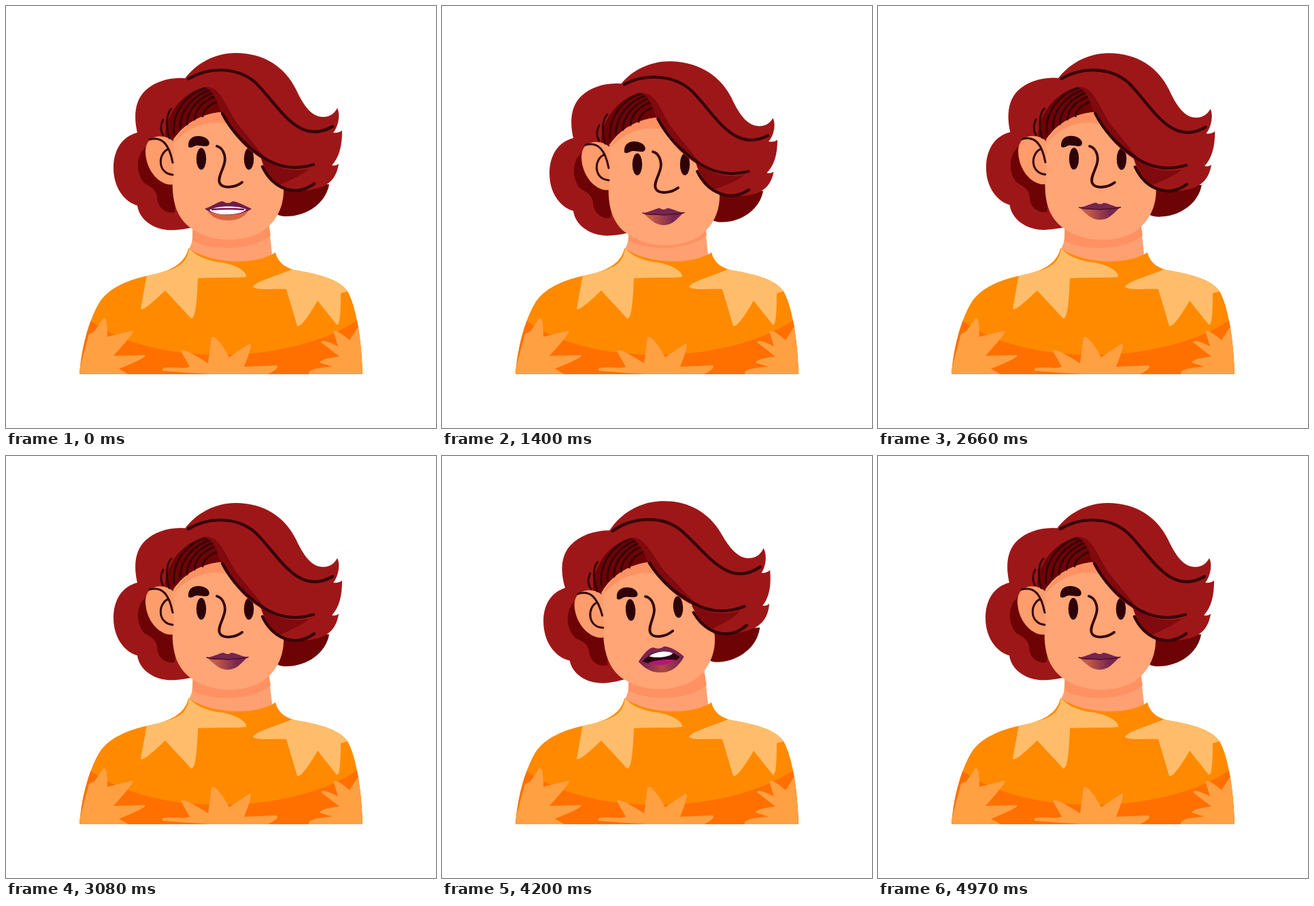
Animation, 632 px wide and 620 px high, one loop 5.25 s. Source, as an HTML page:

```html
<!DOCTYPE html>
<html lang="en">
<head>
<meta charset="utf-8">
<style>
  html, body { margin: 0; width: 100%; height: 100%; overflow: hidden; background: #fff; }
  svg { display: block; width: 632px; height: 620px; }
  .hair { fill: #9e1718; }
  .dark { fill: #6e0305; }
  .deep { fill: #800a0d; }
  .skin { fill: #ffa576; }
  .shade { fill: #ff9163; }
  .ink { fill: #2e0207; }
  .line { fill: none; stroke: #350207; stroke-width: 4.4; stroke-linecap: round; }
  .thin { stroke-width: 3; }
</style>
</head>
<body>
<svg viewBox="0 0 632 620">
  <defs>
    <path id="torso" d="M108 541C110 512 119 466 137 436 151 413 183 401 214 395 245 389 264 376 268 356 303 379 365 382 396 362 400 378 412 386 430 389 460 394 490 402 502 419 519 450 523 510 524 541Z"/>
    <clipPath id="cut"><use href="#torso"/></clipPath>
    <linearGradient id="lip"><stop offset=".2" stop-color="#c85a45"/><stop offset=".75" stop-color="#78264f"/></linearGradient>
    <linearGradient id="lowLip"><stop offset=".1" stop-color="#7d2450"/><stop offset=".5" stop-color="#b04745"/><stop offset="1" stop-color="#74204c"/></linearGradient>
  </defs>

  <g class="head">
    <path class="hair" d="M280 108C250 102 222 108 205 124 188 140 188 165 193 186 170 192 158 212 158 238 158 268 175 288 193 293 196 315 220 332 250 329 262 328 272 326 278 324L330 200 322 128Z"/>
    <path class="dark" d="M208 205C190 218 190 245 203 260 212 266 220 268 222 280 222 296 235 306 248 303L252 240Z"/>
    <path id="under" class="dark" d="M372 222L462 262 475 262C470 290 442 309 412 309 404 309 399 307 396 304L380 270Z"/>
  </g>

  <path d="M275 310H385L391 364 380 390 290 385 268 358Q274 350 274 338Z" fill="#ffa072"/>
  <path class="shade" d="M275 320H386L389 337C360 360 305 360 274 345Z"/>
  <use href="#torso" fill="#ff8a00"/>
  <g clip-path="url(#cut)">
    <g fill="#ffbd6b">
      <path d="M269 356C266 378 255 388 207 395L198 445Q202 449 234 418L272 459Q280 462 282 400C310 398 340 400 353 398 355 390 335 378 310 376 290 372 278 366 269 356Z"/>
      <path d="M420 387C400 396 365 405 363 413 370 418 395 415 412 416L428 470Q434 474 458 433L486 468Q492 472 492 422L503 419C490 402 470 394 440 388Z"/>
    </g>
    <path d="M100 440C180 535 430 535 532 450V541H100Z" fill="#ff7000"/>
    <g fill="#ffa042">
      <path d="M106 541L122 482 130 478 143 459Q149 455 149 486L186 477Q191 478 158 514L204 513Q209 516 166 533L180 541Z"/>
      <path d="M230 532C250 529 262 534 270 530L257 507Q260 501 297 525L302 487Q309 482 328 516L358 496Q364 495 350 530L398 528Q403 532 385 541H300L230 536Z"/>
      <path d="M526 541H445Q442 532 480 530L461 524Q462 518 490 515L463 494Q464 488 488 500L481 478Q486 474 505 491L517 472 526 490Z"/>
    </g>
  </g>

  <g class="head">
    <path class="dark" d="M234 196C232 165 255 125 300 117L330 165C290 160 265 175 247 200Z"/>
    <path class="skin" d="M246 196C262 172 290 157 318 156L360 200 408 268C409 298 394 321 374 333 345 348 300 348 270 325 250 310 243 285 245 250Z"/>
    <path class="shade" d="M245 203C262 172 290 157 318 156L336 176C300 165 270 175 245 203Z"/>
    <path fill="#ff9c6c" d="M247 200C236 188 206 186 205 213 205 245 230 266 246 262Z"/>
    <path class="line thin" d="M211 196C230 191 240 204 245 230M239 210C223 216 222 246 245 248"/>
    <path class="line thin" d="M231 190C226 182 228 173 231 167M240 194C234 176 236 158 243 151M247 187C244 160 262 126 300 119M256 180C255 155 274 130 304 122M266 174C266 154 282 134 308 126M277 167C278 150 292 138 312 131M289 162C291 150 302 143 316 139"/>
    <path class="ink" d="M268 204C268 191 283 188 294 194 301 199 300 206 294 206 287 206 280 203 275 207 270 209 267 208 268 204Z"/>
    <g class="ink">
      <ellipse class="eye" cx="287" cy="224.500" rx="7.200" ry="16"/>
      <ellipse class="eye" cx="357" cy="224.500" rx="7.200" ry="16"/>
    </g>
    <path class="line" style="stroke-width:3.8" d="M310 206C318 208 324 219 321 231 318 243 311 252 314 260 318 269 337 267 347 259"/>

    <g class="mouth">
      <path d="M292 298C305 293 314 286 319 287Q326 292 333 287C340 287 350 293 361 298 350 305 340 307 326 307 312 307 300 304 292 298Z" fill="#6f1c49"/>
      <path d="M296 301C305 306 315 307 326 307 340 307 350 304 357 300 350 311 340 315 326 315 312 315 302 310 296 301Z" fill="#d9643f"/>
      <path d="M299 300C310 293 342 293 353 299 345 308 308 309 299 300Z" fill="#fff"/>
      <path d="M302 299Q326 297 350 299" fill="none" stroke="#7a1250" stroke-width="2.600"/>
    </g>
    <g class="mouth">
      <path d="M294 301C302 290 312 280 318 282Q326 286 333 281C342 282 354 290 361 298 352 312 342 319 328 319 312 319 302 311 294 301Z" fill="url(#lowLip)"/>
      <path d="M294 301C302 290 312 280 318 282Q326 286 333 281C342 282 354 290 361 298L350 296 310 297Z" fill="#7b2650"/>
      <path d="M300 301C310 291 318 288 328 288 340 288 350 293 355 298 345 309 315 310 300 301Z" fill="#300513"/>
      <path d="M310 294C320 287 338 287 345 292 340 297 320 298 310 294Z" fill="#fff"/>
      <path d="M308 304C320 299 340 300 349 302 340 309 317 310 308 304Z" fill="#b5177a"/>
    </g>
    <g class="mouth">
      <path d="M296 296.500C305 304 312 314 326 314 339 314 346 304 355 295.500Z" fill="url(#lip)"/>
      <path d="M295 296C306 295 314 289 320 289Q326 293 331 289C338 289 346 295 356 295.500 344 299 337 297 326 299 314 298 307 299 295 296Z" fill="#74264f"/>
      <path d="M295 296C306 300 314 297 326 299 337 297 344 299 356 295.500" fill="none" stroke="#4b1030" stroke-width="1.500" stroke-linecap="round"/>
    </g>

    <g id="fringe">
      <path class="hair" d="M262 108C279 84 308 69 337 69 380 69 410 90 426 122 438 148 450 163 466 163 477 163 483 157 487 150 492 160 488 178 481 186 487 187 491 185 494 183 494 205 490 222 479 234 483 235 486 234 489 232 486 250 478 260 464 266 446 272 426 273 410 268 393 261 381 245 375 224 345 205 328 180 316 156 308 132 302 121 291 119 278 118 266 124 250 136Z"/>
      <path class="deep" d="M291 119C314 117 318 138 338 170 352 188 366 204 380 222 345 206 328 180 316 156 308 132 302 121 291 119Z"/>
      <path class="deep" d="M374 221C400 243 425 243 446 239 432 251 420 254 402 263 388 254 380 240 374 221Z"/>
      <path class="line" d="M268 107C296 90 338 88 366 112 400 144 428 207 480 177M318 158C330 181 350 204 376 221 400 238 425 241 452 233M377 236C392 268 425 282 453 261"/>
    </g>
  </g>
</svg>
<script>
  const LOOP = 5250, STEP = 70;
  const all = q => [...document.querySelectorAll(q)];
  const heads = all('.head'), eyes = all('.eye'), mouths = all('.mouth');
  const [under, fringe] = all('#under, #fringe');

  // Tracks are [time, value] pairs, eased by a cosine.
  const nod = [[560, 0], [980, 1], [1230, 1], [1820, 0]];
  const sag = [[560, 0], [980, 1], [1300, .7], [1840, 1.1], [2060, 0]];
  const tilt = [[2590, 0], [2835, 2], [3080, 0], [4060, -3.6], [4260, -3.6], [4970, 0]];
  const swing = [[3640, 0], [4200, -1], [4900, 0]];
  const blink = [[1750, 1], [1855, .1], [1925, .1], [2030, 1]];
  const speech = [0, 2, 1, 0, 2, 1, 2, 0, 2]; // 0 teeth, 1 open, 2 closed

  function at(track, t) {
    const i = track.findIndex(k => k[0] > t);
    if (i < 0) return track[track.length - 1][1];
    if (!i) return track[0][1];
    const [t0, a] = track[i - 1], [t1, b] = track[i];
    return a + (b - a) * (1 - Math.cos(Math.PI * (t - t0) / (t1 - t0))) / 2;
  }

  const move = (el, value) => el.setAttribute('transform', value);
  const about = (x, y, change) => `translate(${x} ${y}) ${change} translate(${-x} ${-y})`;

  function draw(now) {
    const t = Math.min(4970, Math.floor(now % LOOP / STEP) * STEP);
    const drop = at(sag, t), turn = at(swing, t);
    for (const h of heads) move(h, `translate(0 ${10 * at(nod, t)}) rotate(${at(tilt, t)} 310 382)`);
    move(fringe, about(267, 107, `skewY(${2 * drop}) rotate(${drop + turn}) scale(1 ${1 - .055 * drop})`));
    move(under, about(385, 250, `rotate(${1.5 * drop}) scale(${1 - .04 * drop} 1)`));

    const open = at(blink, t);
    for (const e of eyes) e.setAttribute('ry', 16 * open);

    const beat = Math.floor((t < 1800 ? t : t + STEP) / 210);
    mouths.forEach((m, i) => m.style.display = i === speech[beat % 9] ? '' : 'none');
    requestAnimationFrame(draw);
  }
  requestAnimationFrame(draw);
</script>
</body>
</html>
```
